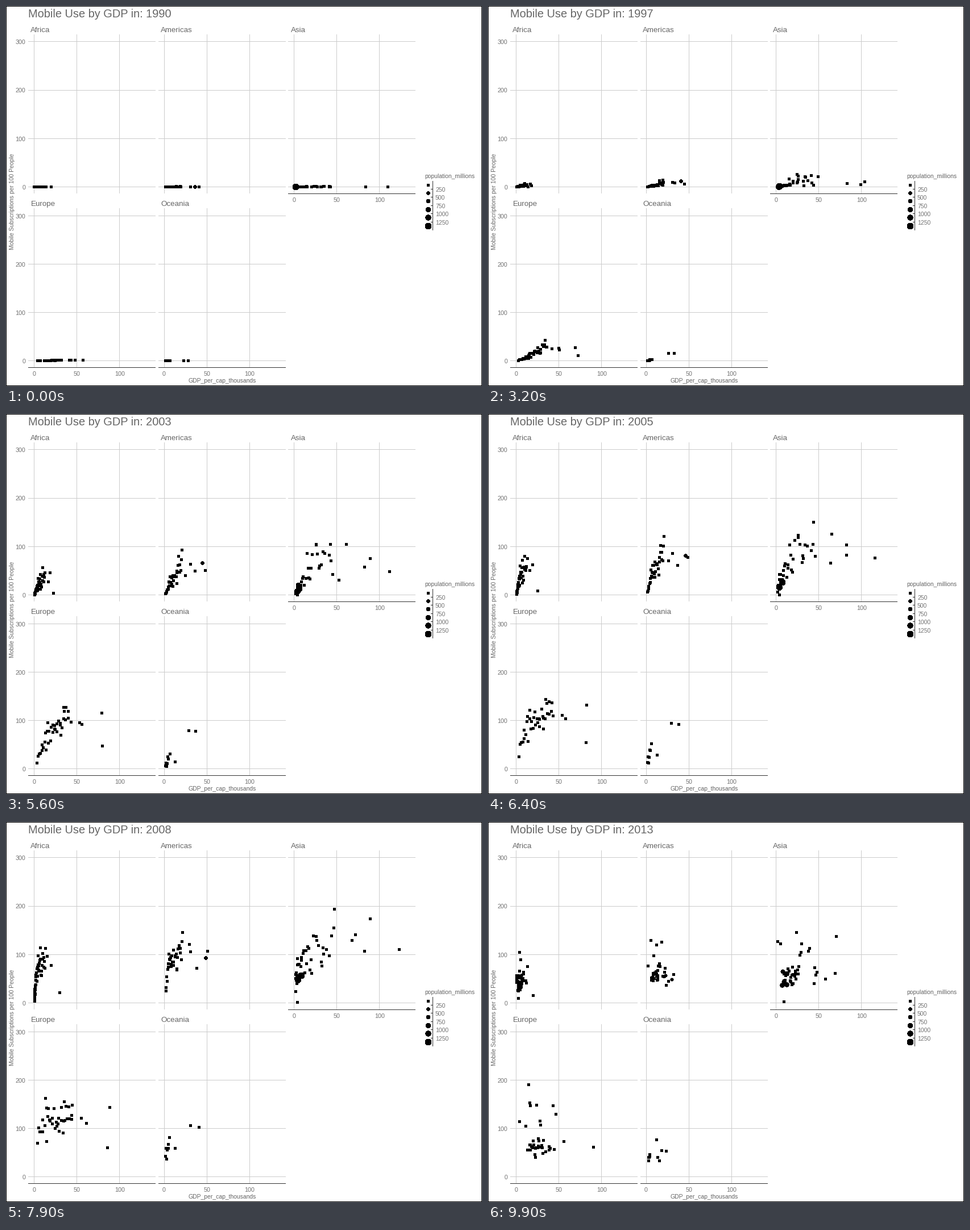
Recreate the animation shown at these times as a matplotlib script. Size 837 px wide and 669 px high, loop 10000 ms.

```python
import numpy as np
import matplotlib.pyplot as plt
from matplotlib.animation import FuncAnimation

W, H = 837, 669
AFR, AME, ASI, EUR, OCE = range(5)
NAMES = ["Africa", "Americas", "Asia", "Europe", "Oceania"]
SX, SY = 1.503, 0.852
GRID, INK, TEXT = "#cccccc", "#333333", "#737373"
DOT = 2.2

plt.rcParams["font.family"] = "Liberation Sans"
rng = np.random.default_rng(5)
countries = []


def country(panel, gdp0, gdp1, takeoff, cap, bend=1, r=DOT, joins=1990):
    """Income runs from gdp0 (1990) to gdp1 (mid 2010); phones follow an S-curve to cap."""
    countries.append((panel, gdp0, gdp1, takeoff, cap, bend, r, joins))


def crowd(panel, n, lo, hi, skew, start, lag, cap, spread, late=0.1):
    """Countries spread over an income range; the poorer they are, the later phones arrive."""
    for i in range(n):
        u = np.clip((i + 0.5 + rng.normal(0, 0.4)) / n, 0, 1)
        gdp1 = lo + (hi - lo) * u ** skew
        gdp0 = gdp1 * np.clip(rng.normal(start, 0.1), 0.4, 1.2)
        wait = 3.2 * max(0, np.log(70 / (gdp0 + gdp1)))
        takeoff = 1999.7 + lag + wait + rng.normal(0, 0.8)
        joins = rng.integers(1991, 1997) if rng.random() < late else 1990
        country(panel, gdp0, gdp1, takeoff, max(rng.normal(cap, spread), 35), joins=joins)


country(AFR, 14, 21, 2002.5, 82)
country(AFR, 20, 15, 2005.8, 124)
country(AFR, 4, 33, 2007.5, 34)
country(AFR, 12, 13.5, 2004.3, 130)
crowd(AFR, 46, 0.5, 13, 2.2, 0.9, 0, 96, 18)

country(AME, 36.5, 50, 2001.3, 96, r=2.9)
country(AME, 31, 39, 2001.5, 74)
country(AME, 41, 52, 2003.6, 118)
country(AME, 31, 31, 2002.4, 112)
country(AME, 14, 31, 2005.2, 148)
crowd(AME, 32, 2, 22, 1.1, 0.78, 1.5, 116, 24)

country(ASI, 84, 127.5, 2004, 125)
country(ASI, 110, 58, 2002.6, 138, bend=2)
country(ASI, 27, 107.5, 2007.8, 300, bend=2.5)
country(ASI, 35, 76, 2000.9, 145)
country(ASI, 31, 49, 2003, 210)
country(ASI, 42.5, 47, 2006, 205)
country(ASI, 41, 44, 2003.3, 152)
country(ASI, 84, 82, 2003, 115)
country(ASI, 2, 10, 2006.6, 80, bend=1.5, r=5.3)
country(ASI, 2, 5, 2008.8, 100, r=4.9)
country(ASI, 4, 4, 2014, 10)
crowd(ASI, 36, 2, 42, 2, 0.85, 1, 114, 24)

country(EUR, 57.5, 92, 2000.2, 147)
country(EUR, 65, 88, 2000.5, 62, joins=1995)
country(EUR, 43, 63, 1999.7, 113)
country(EUR, 48, 56, 2000.3, 124)
country(EUR, 32, 36, 1999.9, 158)
country(EUR, 10, 14, 2005, 195, joins=1996)
crowd(EUR, 34, 4, 47, 1, 0.72, 0, 118, 18, 0.35)

country(OCE, 28.5, 42, 2000.8, 106)
country(OCE, 23, 32, 2000.9, 109)
country(OCE, 14, 12.5, 2006.3, 80, joins=2002)
crowd(OCE, 7, 1.5, 7, 1.3, 0.9, 0, 82, 10)

panels, gdp0, gdp1, takeoff, caps, bends, radii, joins = np.array(countries).T


def state(year):
    s = ((year - 1990) / 20.5) ** bends
    phones = caps / (1 + np.exp((takeoff - year) / 2.2))
    return np.column_stack([gdp0 + (gdp1 - gdp0) * s, phones, radii])


def return_state():
    """Halfway home: each country heads for another one's starting place."""
    first, mid = state(1990), state(2013)
    for p in range(5):
        rows = np.flatnonzero((panels == p) & (joins == 1990))
        mid[rows] = (mid[rows] + first[np.roll(rows, len(rows) // 2)]) / 2
    return mid


def origin(panel):
    return 49.4 + 228.6 * (panel % 3), np.where(panel < 3, 318.5, 624.8)


def arrival(k):
    return 0 if k == 0 else 5 * k - 1 if k <= 5 else 4 * k + 4


def centre(v):
    return np.floor(v) + 0.5


fig = plt.figure(figsize=((W + 0.01) / 72, (H + 0.01) / 72), dpi=72, facecolor="white")
ax = fig.add_axes([0, 0, 1, 1])
ax.set(xlim=(0, W), ylim=(H, 0))
ax.axis("off")


def line(xs, ys, color):
    ax.plot(xs, ys, color=color, lw=1, solid_capstyle="butt", snap=False, zorder=1)


def hline(y, x0, x1, color=GRID):
    line(np.floor([x0, x1]), [centre(y)] * 2, color)


def vline(x, y0, y1, color=GRID):
    line([centre(x)] * 2, np.floor([y0, y1]), color)


def label(x, y, s, size=10.4, color=TEXT, **kw):
    return ax.text(x, y, s, size=size, color=color, va="baseline", **kw)


def dots(x, y, r):
    return ax.scatter(centre(x), centre(y), s=(2 * np.array(r)) ** 2, c="black",
                      lw=0, antialiased=False, zorder=3)


for p, name in enumerate(NAMES):
    x0, y0 = origin(p)
    left, right = x0 - 10, x0 + 214
    top, bottom = y0 - 268.5, y0 + 12
    for v in (0, 100, 200, 300):
        hline(y0 - v * SY, left, right)
        if p % 3 == 0:
            label(34.5, y0 - v * SY + 4.3, str(v), 10.7, ha="right")
    for v in (0, 50, 100):
        vline(x0 + v * SX, top, bottom)
        if p >= ASI:
            label(x0 + v * SX, bottom + 14, str(v), 10.7, ha="center")
    if p >= ASI:
        hline(bottom, left, right, INK)
    label(left + 4, top - 4.5, name, 13.4, "#666666")

title = label(39, 20, "", 20, "#666666")
label(380, 663, "GDP_per_cap_thousands", color="#666666", ha="center")
label(13.5, 344, "Mobile Subscriptions per 100 People", color="#666666",
      ha="center", rotation=90, rotation_mode="anchor")

label(736, 303, "population_millions", color="#666666")
vline(750, 308, 395, INK)
for i in range(5):
    y = 322.5 + 14.4 * i
    hline(y, 747, 751, INK)
    label(755, y + 4.5, str(250 * (i + 1)))
dots(np.full(6, 742), 315 + 14.4 * np.arange(6), np.linspace(DOT, 5.3, 6))

for y in (0, H - 1):
    hline(y, 0, W, "black")
for x in (0, W - 1):
    vline(x, 0, H, "black")
points = dots([], [], [])


def draw(i):
    k = max(n for n in range(24) if arrival(n) <= i)
    moving = i == arrival(k + 1) - 1
    if moving and k == 23:
        gdp, phones, r = return_state().T
    else:
        gdp, phones, r = state(1990 + k + 0.5 * moving).T
    ox, oy = origin(panels)
    xy = centre(np.column_stack([ox + SX * gdp, oy - SY * phones]))
    seen = joins <= 1990 + k
    points.set_offsets(xy[seen])
    points.set_sizes((2 * r[seen]) ** 2)
    title.set_text(f"Mobile Use by GDP in: {1990 + k}")
    return points, title


anim = FuncAnimation(fig, draw, frames=100, interval=100, repeat=True, repeat_delay=0)
plt.show()
```
